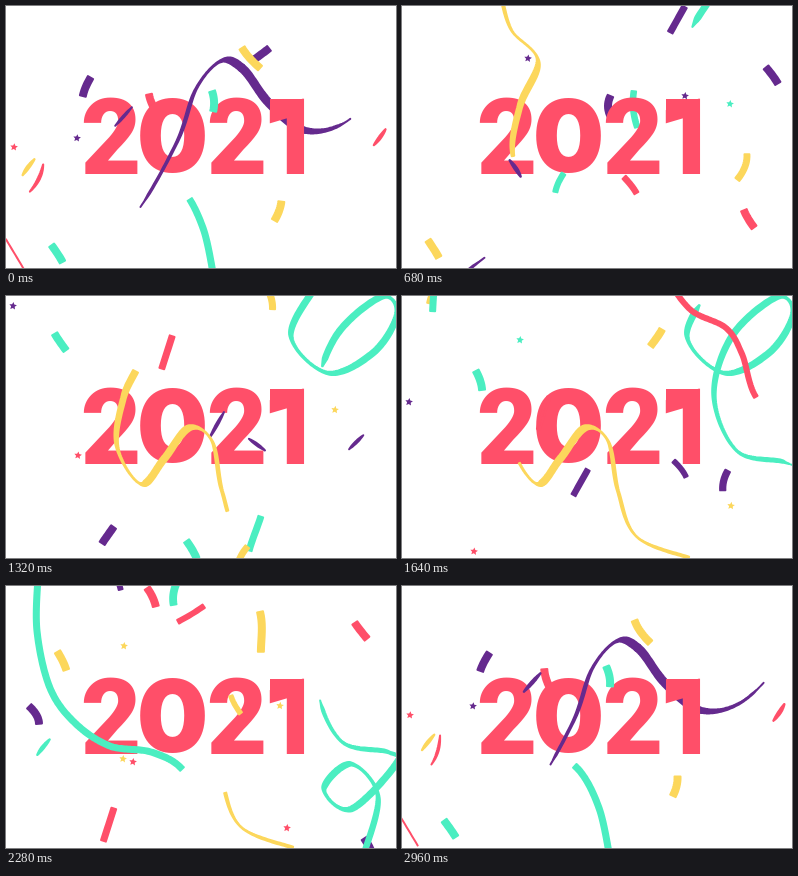
An HTML page with a canvas that plays this animation: 390 by 262 pixels, repeating every 3 s.

```html
<!DOCTYPE html>
<html lang="en">
<head>
<meta charset="utf-8">
<title>2021</title>
<style>
html, body { margin: 0; width: 100%; height: 100%; overflow: hidden; background: #fff; }
canvas { display: block; }
</style>
</head>
<body>
<canvas id="stage" width="390" height="262" aria-label="2021"></canvas>
<script>
const LOOP = 3000, WIDTH = 390, HEIGHT = 262;
const ctx = document.getElementById('stage').getContext('2d');
const RED = '#ff4f69', PURPLE = '#652a8e', TEAL = '#4beec1', YELLOW = '#fcd75c';
const flakes = [], ribbons = [], stars = [];

// Band with soft corners along points [x, y, width]
function strip(pts, color) {
  if (pts.length < 2) return;
  const edge = 2, left = [], right = [];
  pts.forEach(([x, y, w], i) => {
    const p = pts[Math.max(i - 1, 0)], q = pts[Math.min(i + 1, pts.length - 1)];
    const dx = q[0] - p[0], dy = q[1] - p[1], d = Math.hypot(dx, dy) || 1;
    const h = Math.max(w - edge, 0) / 2;
    left.push([x - dy / d * h, y + dx / d * h]);
    right.unshift([x + dy / d * h, y - dx / d * h]);
  });
  ctx.beginPath();
  left.concat(right).forEach(p => ctx.lineTo(...p));
  ctx.closePath();
  ctx.fillStyle = ctx.strokeStyle = color;
  ctx.lineWidth = Math.min(edge, pts[pts.length >> 1][2]);
  ctx.lineJoin = 'round';
  ctx.fill();
  ctx.stroke();
}

// A flake falls steadily down a swaying path, lies along it and passes y = 100 at `time`
function flake(color, x, sway, time, options) {
  flakes.push({
    color, x, sway, time, drift: 0, front: false, speed: 0.12, len: 20, w: 8,
    crest: 100, wave: 180, until: 300, ...options
  });
}

function drawFlake(f, t) {
  const y = 100 + (t - f.time) * f.speed;
  if (y < -30 || y > f.until) return;
  const k = 2 * Math.PI / f.wave;
  const pathX = v => f.x + f.drift * (v - 100) + f.sway * Math.cos(k * (v - f.crest));
  const turn = Math.sin(k * (y - f.crest));
  const reach = f.len / 2 / Math.hypot(1, f.drift - f.sway * k * turn);
  const w = f.w * (1 - 0.5 * Math.max(0, turn));
  const pts = [];
  for (let u = -1; u < 1.01; u += 0.2) {
    const v = y + u * reach;
    pts.push([pathX(v), v, w < 5 ? w * (1 - 0.5 * u * u) : w]);
  }
  strip(pts, f.color);
}

// Smooth curve through key points, as [x, y, distance, slant]; slant is -1 for "/" and 1 for "\"
function curve(keys) {
  const pts = [];
  let dist = 0;
  for (let i = 0; i < keys.length - 1; i++) {
    const b = keys[i], c = keys[i + 1], a = keys[i - 1] || b, d = keys[i + 2] || c;
    for (let u = 0; u < 1; u += 0.04) {
      const [x, y] = b.map((v, n) => v + 0.5 * u * (c[n] - a[n]
        + u * (2 * a[n] - 5 * v + 4 * c[n] - d[n] + u * (3 * (v - c[n]) + d[n] - a[n]))));
      const p = pts[pts.length - 1] || [x, y - 0.01];
      const dx = x - p[0], dy = y - p[1], step = Math.hypot(dx, dy) || 1;
      dist += step;
      pts.push([x, y, dist, 2 * dx * dy / (step * step)]);
    }
  }
  return pts;
}

// A ribbon is drawn along its curve and then wiped away; head and tail are [start time, speed].
// A flat nib makes it broad in one slant; past `split` it runs in front of the lettering.
function ribbon(color, keys, head, tail, { w = 8, nib = 0, taper = 0, split = 0 } = {}) {
  ribbons.push({ color, pts: curve(keys), head, tail, w, nib, taper, split });
}

function drawRibbon(r, t, front) {
  const at = ([begin, speed]) => (t - begin) * speed;
  const head = at(r.head), tail = Math.max(0, at(r.tail));
  const shown = r.pts.filter(([, , s]) => s >= tail && s <= head && (front ? s >= r.split : s <= r.split + 2));
  strip(shown.map(([x, y, s, slant]) => {
    const end = r.taper ? Math.min(1, 0.3 + Math.min(s - tail, head - s) / r.taper) : 1;
    return [x, y, r.w * (0.67 + 0.33 * r.nib * slant) * end];
  }), r.color);
}

// A star drops straight down and passes y = 100 at `time`
const star = (color, x, time, speed = 0.3) => stars.push({ color, x, time, speed });

function drawStar(s, t) {
  const y = 100 + (t - s.time) * s.speed;
  if (y < -8 || y > HEIGHT + 8) return;
  ctx.beginPath();
  for (let i = 0; i < 10; i++) {
    const a = i * Math.PI / 5 - 1.45, r = i % 2 ? 1.9 : 4;
    ctx.lineTo(s.x + r * Math.cos(a), y + r * Math.sin(a));
  }
  ctx.fillStyle = s.color;
  ctx.fill();
}

// Each digit is sized by its own ink height and centred on its ink
const digits = [['2', 'Roboto', 104], ['0', 'Inter', 166.5], ['2', 'Roboto', 230], ['1', 'Roboto', 281]]
  .map(([ch, family, cx]) => {
    const font = size => `900 ${size}px ${family}, "Open Sans", sans-serif`;
    ctx.font = font(100);
    const m = ctx.measureText(ch);
    const k = 75.5 / (m.actualBoundingBoxAscent + m.actualBoundingBoxDescent);
    return {
      ch, font: font(100 * k),
      x: cx - (m.actualBoundingBoxRight - m.actualBoundingBoxLeft) * k / 2,
      y: 167.5 - m.actualBoundingBoxDescent * k
    };
  });

function drawDigits() {
  ctx.fillStyle = RED;
  for (const d of digits) {
    ctx.font = d.font;
    ctx.fillText(d.ch, d.x, d.y);
  }
  ctx.fillRect(264, 93, 33, 16); // square flag of the 1
}

ribbon(YELLOW, [[100, -5], [110, 25], [136, 55], [118, 100], [111, 150], [135, 188],
  [158, 163], [183, 132], [206, 145], [216, 195], [235, 241], [288, 262]],
  [181, 0.347], [1017, 0.305], { nib: -1 });
ribbon(PURPLE, [[395, 35], [375, 80], [338, 117], [298, 124], [263, 97], [237, 63],
  [215, 55], [190, 83], [170, 138], [124, 215], [65, 265]],
  [2290, 0.6], [2840, 0.59], { w: 9, nib: 1, taper: 22, split: 232 });
ribbon(TEAL, [[310, -10], [285, 40], [322, 77], [368, 56], [391, 18], [375, 1], [330, 40], [312, 100],
  [335, 155], [382, 166], [390, 178], [345, 223], [318, 203], [345, 178], [372, 210], [358, 268]],
  [600, 0.46], [1600, 0.55], { nib: -0.7, taper: 14 });
ribbon(RED, [[268, -12], [290, 15], [324, 32], [340, 58], [356, 104], [400, 135]],
  [1350, 0.52], [1660, 0.42], { w: 9 });
ribbon(TEAL, [[32, -10], [31, 45], [44, 102], [69, 137], [104, 160], [145, 166],
  [176, 183], [197, 222], [208, 272]],
  [1570, 0.39], [2280, 0.4], { w: 10.5 });

// Swaying flakes
flake(RED, 363, 24, 2740);
flake(TEAL, 184, 24, 3040, { drift: -0.08, front: true });
flake(YELLOW, 40, 22, 2490, { drift: -0.1, front: true });
flake(TEAL, 56, 24, 1770, { drift: -0.1 });
flake(PURPLE, 355, 27, 935, { drift: -0.08 });
flake(PURPLE, 98, -22, 3160, { drift: 0.05, front: true });
flake(YELLOW, 247, -24, 2125, { drift: 0.05, front: true });
flake(RED, 169, -22, 3020, { drift: 0.5, until: 205 });
flake(PURPLE, 246, -40, 680, { speed: 0.076, until: 190 });
flake(YELLOW, 288, 57, 3300, { speed: 0.16, len: 27, crest: 150, wave: 250, front: true });
flake(PURPLE, -20, 53, 2073, { speed: 0.14, crest: 138 });

// Streaks that drop faster
flake(RED, 86, -29, 2640, { drift: -1.06, speed: 0.2, len: 30, w: 6, front: true });
flake(TEAL, 243, -12, 665, { drift: 0.05, speed: 0.21, len: 36, w: 7 });
flake(PURPLE, 227, 0, 1160, { drift: -0.56, speed: 0.18, len: 29, w: 7, front: true });
flake(RED, 147, 0, 1550, { drift: -0.32, speed: 0.19, len: 34, w: 7, front: true });
flake(YELLOW, 281, -18, 2455, { drift: 0.57, speed: 0.31, len: 40, until: 220 });
flake(PURPLE, 127, 0, 2970, { drift: -0.9, speed: 0.35, len: 25, w: 4.5, front: true });
flake(RED, -80, 0, 1760, { drift: 0.6, len: 36, w: 2 });

star(PURPLE, 71, 2893);
star(RED, 8, 2863);
star(PURPLE, 126, 820, 0.34);
star(PURPLE, 283, 704, 0.42);
star(TEAL, 328, 687);
star(YELLOW, 329, 1274);
star(RED, 72, 1122);
star(TEAL, 118, 1780, 0.4);
star(PURPLE, 7, 1620);
star(YELLOW, 118, 2380, 0.4);
star(YELLOW, 117, 2037);
star(RED, 127, 2027);
star(RED, 281, 1925, 0.4);
star(YELLOW, 274, 2225, 0.36);

function drawLayer(t, front) {
  // Pieces that outlive the loop carry on into its start
  for (const time of [t, t + LOOP]) {
    flakes.forEach(f => f.front === front && drawFlake(f, time));
    ribbons.forEach(r => drawRibbon(r, time, front));
    if (front) stars.forEach(s => drawStar(s, time));
  }
}

const start = performance.now();
function frame() {
  const t = Math.floor((performance.now() - start) % LOOP / 40) * 40;
  ctx.fillStyle = '#fff';
  ctx.fillRect(0, 0, WIDTH, HEIGHT);
  drawLayer(t, false);
  drawDigits();
  drawLayer(t, true);
  requestAnimationFrame(frame);
}
frame();
</script>
</body>
</html>
```
